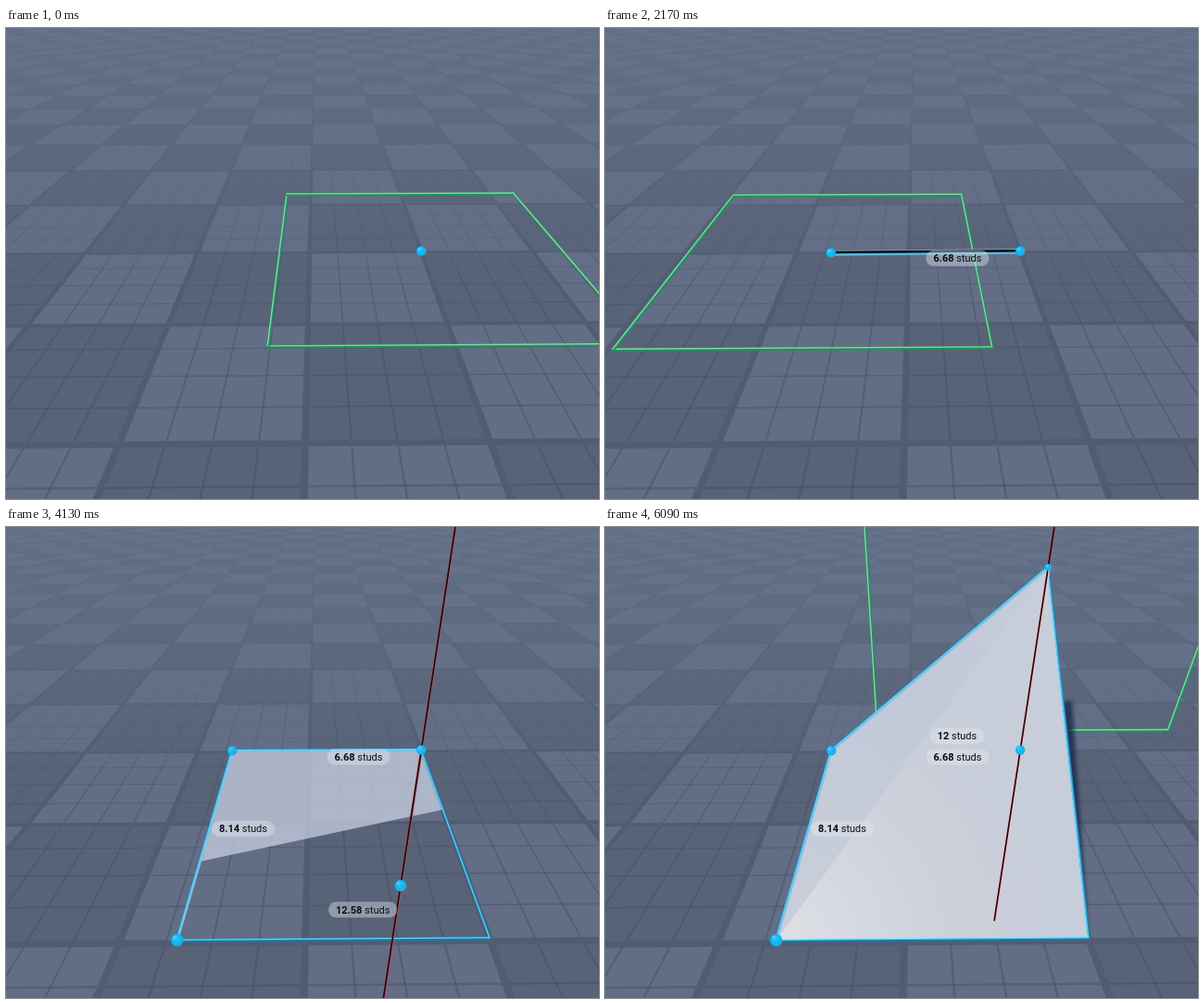
Animation, 640 px wide and 508 px high, one loop 6510 ms. Source, as an HTML page with a canvas:

```html
<!DOCTYPE html>
<html lang="en">
<head>
<meta charset="utf-8">
<title>Drawing a face on a grid</title>
<style>
  html, body { margin: 0; width: 100%; height: 100%; overflow: hidden; background: #5b667c; }
  canvas { display: block; width: 640px; height: 508px; }
</style>
</head>
<body>
<canvas id="stage" width="640" height="508"></canvas>
<script>
const W = 640, H = 508, LOOP = 6510, STEP = 70;
const ctx = document.getElementById('stage').getContext('2d');

// Floor coordinates: u to the right, v into the distance (one tile each), h in studs.
const STUD_U = 3.94, STUD_V = 4.07, HALF_U = 1.27, HALF_V = 1.25, HALF_H = 5, AXIS = 15;
const P = { u: 1.003, v: 2.019 };
const B = { u: -0.692, v: 2.019 };

// time, u, v of the pointer on the floor
const POINTER = [
  [140, 1.003, 2.019], [210, .98, 1.95], [490, .75, 1.1], [630, .45, .92],
  [770, .208, 1.052], [840, -.104, 1.63], [980, -.22, 1.62], [1260, -.5, 2],
  [1540, -.568, 2.019], [1610, -.568, 2.019], [1750, -.692, 2.019],
  [2240, -.692, 2], [2310, -.69, 1.85], [2450, -.69, .9], [2520, -.685, .326],
  [2590, -.683, .309], [2940, -.69, .1], [3080, -.692, .019],
  [3220, -.692, .019], [3430, -.1, 1.6], [3570, .1, 2.2]
];
// time, height of the pulled corner
const LIFT = [
  [3850, 0], [3920, -3], [3990, -6], [4060, -6.883], [4130, -6.85], [4340, -7],
  [4620, -.3], [4970, 3.786], [5040, 5], [5180, 5.2], [5320, 3.85], [5600, 5.7],
  [5740, 5], [5880, 3.85], [5950, 6.15], [6020, 5.755]
];
const T = { wallOn: 1960, wallOff: 2170, quad: 2240, corner: 3220, squareOff: 3640, lift: 3920 };

function sample(table, t, col) {
  if (t <= table[0][0]) return table[0][col];
  for (let i = 1; i < table.length; i++) {
    const a = table[i - 1], b = table[i];
    if (t <= b[0]) return a[col] + (b[col] - a[col]) * (t - a[0]) / (b[0] - a[0]);
  }
  return table[table.length - 1][col];
}
const pointer = t => ({ u: sample(POINTER, t, 1), v: sample(POINTER, t, 2) });
const lift = t => sample(LIFT, t, 1);

function project(u, v, h = 0) {
  const d = .001931 + .000636 * v + .0000055 * u, k = h * .0001216, w = d - k;
  return [(335 * d - .0235 + .387 * u - 340 * k) / w, (1 - 70 * d - 950 * k) / w];
}
const at = p => project(p.u, p.v, p.h || 0);

function trace(c, pts, close) {
  c.beginPath();
  pts.forEach(p => c.lineTo(p[0], p[1]));
  if (close) c.closePath();
}
function fill(c, pts, style) {
  trace(c, pts, true);
  c.fillStyle = style;
  c.fill();
}
function line(a, b, style, width, dx = 0, dy = 0) {
  trace(ctx, [[a[0] + dx, a[1] + dy], [b[0] + dx, b[1] + dy]]);
  ctx.strokeStyle = style;
  ctx.lineWidth = width;
  ctx.stroke();
}

function makeFloor() {
  const cv = document.createElement('canvas');
  cv.width = W;
  cv.height = H;
  const c = cv.getContext('2d');
  const patch = (u0, v0, u1, v1, style) =>
    fill(c, [project(u0, v0), project(u1, v0), project(u1, v1), project(u0, v1)], style);
  const down = (y0, y1, from, to) => {
    const g = c.createLinearGradient(0, y0, 0, y1);
    g.addColorStop(0, from);
    g.addColorStop(1, to);
    return g;
  };
  const U = 14, V = 22;
  c.fillStyle = '#5d687e';
  c.fillRect(0, 0, W, H);
  for (let v = V; v >= -1; v--)
    for (let u = -U; u < U; u++)
      patch(u, v, u + 1, v + 1, (u + v) & 1 ? '#636e86' : '#586378');
  const rule = (n, r, style) => {
    for (let u = -U; u <= U; u += n) patch(u - r, -1, u + r, V, style);
    for (let v = -1; v <= V; v += n) patch(-U, v - r, U, v + r, style);
  };
  rule(.25, .006, down(40, 300, 'rgba(64,74,96,.08)', 'rgba(64,74,96,.42)'));
  rule(1, .02, down(0, 260, 'rgba(81,92,114,.35)', 'rgba(81,92,114,1)'));
  c.fillStyle = down(0, 280, 'rgba(106,119,143,.6)', 'rgba(100,113,138,0)');
  c.fillRect(0, 0, W, 280);
  return cv;
}
const floor = makeFloor();

// Green guide edge; optional fade [from, to, alpha at from].
function guide(a, b, fade) {
  const paint = rgb => {
    if (!fade) return `rgb(${rgb})`;
    const g = ctx.createLinearGradient(a[0], a[1], b[0], b[1]);
    g.addColorStop(fade[0], `rgba(${rgb},${fade[2]})`);
    g.addColorStop(fade[1], `rgba(${rgb},${1 - fade[2]})`);
    return g;
  };
  line(a, b, paint('14,154,82'), 3.2, .3, .6);
  line(a, b, paint('158,200,178'), 1.4, -.4, -.6);
}

function square(c, hasQuad) {
  const l = c.u - HALF_U, r = c.u + HALF_U, n = c.v - HALF_V, f = c.v + HALF_V;
  const fl = project(l, f), fr = project(r, f), nl = project(l, n), nr = project(r, n);
  guide(nl, nr);
  guide(fl, nl);
  guide(fl, fr, hasQuad && [.64, .82, 1]);
  guide(fr, nr, hasQuad && [.05, .09, 0]);
}

function wall(c, h) {
  const top = h + HALF_H, low = h - HALF_H, base = Math.max(0, low);
  if (top <= 0) return;
  const l = c.u - HALF_U, r = c.u + HALF_U;
  const tl = project(l, c.v, top), tr = project(r, c.v, top);
  const bl = project(l, c.v, base), br = project(r, c.v, base);
  guide(tl, tr);
  guide(tl, bl);
  guide(tr, br);
  if (low > .1) guide(bl, br);
}

function dot(p) {
  const [x, y] = p, r = 3.4 + Math.max(0, y) / 135;
  const g = ctx.createRadialGradient(x - r * .5, y - r * .6, 0, x, y, r);
  g.addColorStop(0, '#8cbfd6');
  g.addColorStop(.5, '#14bcf8');
  g.addColorStop(1, '#08b3f2');
  ctx.beginPath();
  ctx.arc(x, y, r, 0, 7);
  ctx.fillStyle = g;
  ctx.fill();
}

function label(a, b) {
  const dh = (a.h || 0) - (b.h || 0);
  const dist = Math.hypot((a.u - b.u) * STUD_U, (a.v - b.v) * STUD_V, dh);
  if (dist < .05) return;
  const [x, my] = project((a.u + b.u) / 2, (a.v + b.v) / 2, ((a.h || 0) + (b.h || 0)) / 2);
  const y = my + 7, num = String(+dist.toFixed(2)), unit = ' studs';
  const bold = '700 11px Roboto, Arial, sans-serif', plain = '400 11px Roboto, Arial, sans-serif';
  ctx.font = plain;
  const uw = ctx.measureText(unit).width;
  ctx.font = bold;
  const nw = ctx.measureText(num).width;
  ctx.beginPath();
  ctx.roundRect(x, y - 8.5, nw + uw + 16, 17, 8.5);
  ctx.fillStyle = 'rgba(225,230,238,.42)';
  ctx.fill();
  ctx.fillStyle = '#0c0e14';
  ctx.textBaseline = 'alphabetic';
  ctx.fillText(num, x + 8, y + 4);
  ctx.font = plain;
  ctx.fillText(unit, x + 8 + nw, y + 4);
}

function rod(a, b) {
  line(a, b, '#56b9e2', 4.4, 0, 1.1);
  line(a, b, '#8f9cb0', 1.4, 0, -1.7);
  line(a, b, '#070a10', 2.5, 0, -.3);
}

function outline(a, b, c, d) {
  line(c, d, '#0b8cc0', 2.6, .4, .6);
  line(c, d, '#62cdf2', 1.2, -.4, -.2);
  line(a, d, '#0b7fae', 3, 0, 1);
  line(a, d, '#74d3f3', 1.3, 0, -.3);
  line(b, c, '#5fcdf8', 2.8);
  line(a, b, '#5fcdf8', 2.8);
}

function flatFace(a, d, h, lifting) {
  const cut = lifting ? Math.min(1, -h / 6.883) : 0;
  const pts = [at(B), at(P), project(P.u, d.v + 1.131 * cut), project(B.u, a.v + .6 * cut)];
  fill(ctx, pts, lifting ? 'rgba(197,205,224,.76)' : 'rgba(186,196,216,.93)');
  if (!lifting && a.v < 1.5) {
    const v = a.v + .11;
    fill(ctx, [project(0, a.v), at(d), project(P.u, v), project(0, v)], 'rgba(120,132,156,.3)');
  }
}

function foldedFace(a, b, apex, d, h) {
  const y = 243 - h * 9.6, k = (y - apex[1]) / (d[1] - apex[1]);
  const x = apex[0] + (d[0] - apex[0]) * k;
  ctx.save();
  ctx.filter = 'blur(2px)';
  fill(ctx, [[x - 4, y], [x + 10, y], [x + 14, y + 60], d, [d[0] - 10, d[1] - 30]], 'rgba(22,42,76,.8)');
  ctx.restore();
  fill(ctx, [a, b, apex, d], '#c6ccd9');
  const tint = ctx.createLinearGradient(a[0], a[1], apex[0], apex[1]);
  tint.addColorStop(0, '#c9cfda');
  tint.addColorStop(.6, '#c1c8d8');
  tint.addColorStop(1, '#c6ccd9');
  fill(ctx, [a, b, apex], tint);
  const glow = ctx.createRadialGradient(a[0], a[1], 0, a[0], a[1], 330);
  const bright = Math.min(1, h / 5.755);
  glow.addColorStop(0, `rgba(222,224,229,${bright})`);
  glow.addColorStop(.3, `rgba(212,216,223,${bright})`);
  glow.addColorStop(.55, `rgba(204,209,219,${bright})`);
  glow.addColorStop(1, 'rgba(200,206,217,.5)');
  fill(ctx, [a, apex, d], glow);
}

function axis(h, apex) {
  const top = project(P.u, P.v, h + AXIS), low = project(P.u, P.v, h - AXIS);
  const red = 'rgba(210,78,84,.75)';
  line(top, apex, red, 3, .3);
  line(apex, low, h > 0 ? '#f3bcc3' : red, h > 0 ? 3.8 : 3, .5);
  line(top, low, '#1c0a10', 1.7);
}

function draw(t) {
  ctx.drawImage(floor, 0, 0);
  ctx.lineCap = 'round';
  ctx.lineJoin = 'round';
  const cur = pointer(t), late = pointer(t - STEP);
  const p = at(P), b = at(B);

  if (t < T.quad) {
    if (t >= T.wallOn && t < T.wallOff) wall(B, 0);
    else square(cur, false);
    const end = at(cur);
    if (t >= 210) {
      rod(p, end);
      dot(end);
    }
    dot(p);
    label(P, late);
    return;
  }

  const corner = s => ({ u: B.u, v: pointer(Math.min(s, T.corner)).v });
  const A = corner(t), D = { u: P.u, v: A.v };
  const a = at(A), d = at(D);
  const lifting = t >= T.lift;
  const h = lifting ? lift(t - STEP) : 0;
  const tip = { u: P.u, v: P.v, h }, apex = at(tip);

  if (lifting) wall(P, lift(t));
  if (h > 0) foldedFace(a, b, apex, d, h);
  else flatFace(A, D, h, lifting);
  if (t < T.squareOff) square(cur, true);
  outline(a, b, h > 0 ? apex : p, d);

  if (lifting) axis(h, apex);
  [b, p, a].forEach(dot);
  if (lifting) dot(apex);

  label(P, B);
  label(B, corner(t - STEP));
  if (lifting) label(A, tip);
}

const start = performance.now();
function frame(now) {
  const t = Math.max(0, now - start) % LOOP;
  draw(Math.floor(t / STEP) * STEP);
  requestAnimationFrame(frame);
}
draw(0);
requestAnimationFrame(frame);
</script>
</body>
</html>
```
